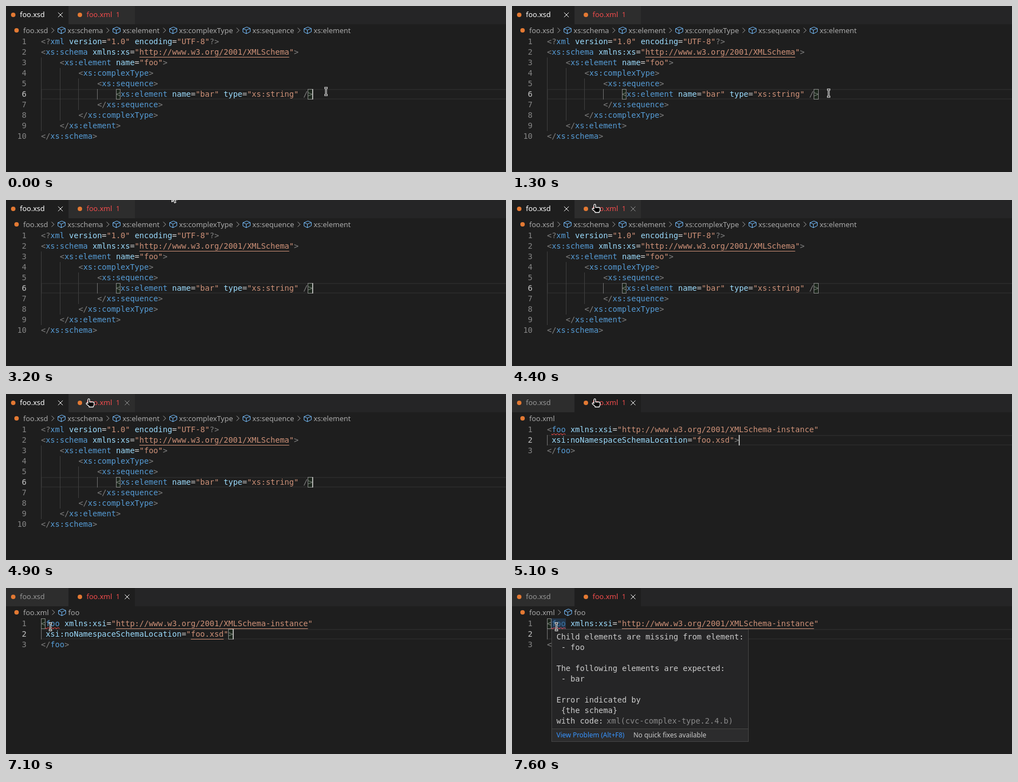
An HTML page that plays this animation: 900 px wide and 300 px high, repeating every 8 s.

```html
<!DOCTYPE html>
<html lang="en">
<meta charset="utf-8">
<title>Schema validation in an editor</title>
<style>
html, body { margin: 0; width: 100%; height: 100%; overflow: hidden; background: #1e1e1e }
body { position: relative; font: 13px "Noto Sans", "Open Sans", sans-serif }
.tabs { position: absolute; left: 0; right: 0; top: 0; height: 33px; background: #252526; overflow: hidden }
.tab { position: absolute; top: 0; height: 33px; background: #2d2d2d; color: #ffffff80; line-height: 31px }
.tab.active { background: #1e1e1e; color: #fff }
.tab > * { position: absolute; top: 0 }
.tab .dot { left: 9px; top: 12px }
.tab span { left: 25px }
.tab svg { top: 8px; stroke: #fff }
.error { color: #f14c4c }
.dot { width: 8px; height: 8px; border-radius: 50%; background: #e37933 }
.crumbs { position: absolute; left: 15px; top: 33px; height: 22px; display: flex; align-items: center; line-height: 22px; color: #a9a9a9; white-space: pre }
.crumbs .dot { margin-right: 8px }
.crumbs svg { flex: none }
.crumbs .cube { margin-right: 3px; stroke: #75beff }
.crumbs .chevron { stroke: #a9a9a9 }
.code, .hover pre { font: 14px/19px "DejaVu Sans Mono", monospace; white-space: pre; color: #d4d4d4 }
.code > * { position: absolute; box-sizing: border-box }
.num { left: 0; width: 37px; text-align: right; color: #858585 }
.num.now { color: #c6c6c6 }
.punct { color: #808080 }
.tag { color: #569cd6 }
.attr { color: #9cdcfe }
.str { color: #ce9178 }
u { text-decoration: none; text-underline-position: under }
.ready u { text-decoration: underline }
.now-line { left: 63px; right: 0; height: 19px; border: 2px solid #282828; border-right: 0 }
.guide { border-left: 1px solid #404040 }
.guide.on { border-color: #707070 }
.match { border: 1px solid #888; background: #0064001a }
.caret { border-left: 2px solid #aeafad; margin-left: -.8px }
.mark { background: #264f7880 }
.hover { position: absolute; left: 71px; top: 74px; background: #252526; border: 1px solid #454545 }
.hover pre { margin: 0; padding: 4px 8px; color: #ccc }
.hover pre span { margin-left: 6px; opacity: .6 }
.status { border-top: 1px solid #454545; background: #2c2c2d; padding: 0 8px; font-size: 12px; line-height: 22px; color: #ccc; white-space: pre }
.status span { color: #3794ff; margin-right: 16px }
#mouse { position: absolute; left: 0; top: 0; overflow: visible }
[hidden] { display: none !important }
</style>
<body>
<div class="tabs">
  <div class="tab" id="tab1" style="left:0;width:112px"><i class="dot"></i><span>foo.xsd</span></div>
  <div class="tab" id="tab2" style="left:113px;width:119px"><i class="dot" style="left:16px"></i><span class="error" style="left:32px">foo.xml</span><b class="error" style="left:85px;font-weight:400;font-size:12px">1</b></div>
</div>
<div id="xsd"></div>
<div id="xml"></div>
<div class="hover" id="hover"><pre>Child elements are missing from element:
 - foo

The following elements are expected:
 - bar

Error indicated by
 {the schema}
with code:<span>xml(cvc-complex-type.2.4.b)</span></pre><div class="status"><span>View Problem (Alt+F8)</span>No quick fixes available</div></div>
<svg id="mouse" width="1" height="1" stroke-linejoin="round">
  <g id="beam" fill="none"><path stroke="#fff" stroke-width="3" d="M-3-6.5H3M0-6.5V6.5M-3 6.5H3"/><path stroke="#000" d="M-2.5-6.5H2.5M0-6.5V6.5M-2.5 6.5H2.5"/></g>
  <path id="arrow" stroke="#fff" stroke-width="1.2" d="M.5 0V13.5L3.5 10.5 5.5 15.3 7.8 14.3 5.8 9.8H10Z"/>
  <path id="hand" stroke="#fff" stroke-width="1.3" d="M-1.5 1.2a1.5 1.5 0 0 1 3 0V5.5H7.5a2 2 0 0 1 2 2V10.5a4 4 0 0 1-1.5 3V14.5H.5V13L-4.2 9.2a1.3 1.3 0 0 1 1.6-2L-1.5 8Z"/>
</svg>
<script>
const $ = id => document.getElementById(id);
const icon = (cls, d) => `<svg class="${cls}" width="16" height="16" fill="none"><path d="${d}"/></svg>`;
const chevron = icon('chevron', 'M6 3.5 10.5 8 6 12.5');
const cube = icon('cube', 'M1.5 5 8.5 2 14.5 4.5V10.5L7.5 14 1.5 11ZM1.5 5 7.5 7.5 14.5 4.5M7.5 7.5V14');

[['tab1', 90], ['tab2', 97]].forEach(([id, x]) =>
  $(id).insertAdjacentHTML('beforeend', icon('close', 'M3.8 3.8 12.2 12.2M12.2 3.8 3.8 12.2').replace('<svg', `<svg style="left:${x}px"`)));

const esc = s => s.replace(/</g, '&lt;').replace(/>/g, '&gt;');
const paint = line => line.replace(/"([^"]*)"|[<>\/?]+|[\w:]+/g, (s, text, i) => {
  const link = /^http|\.xsd$/.test(text);
  const cls = s[0] === '"' ? 'str' : /[<>\/?]/.test(s) ? 'punct' : /[<\/?]/.test(line[i - 1]) ? 'tag' : 'attr';
  return `<span class="${cls}">${link ? `"<u>${text}</u>"` : esc(s)}</span>`;
});

// A box measured in characters and lines
const box = (cls, col, row, w = 0, h = 1, inner = '') =>
  `<div class="${cls}" style="left:calc(63px + ${col}ch);top:${55 + 19 * row}px;width:${w}ch;height:${19 * h}px">${inner}</div>`;

function editor(id, crumbs, source, now, extras) {
  const lines = source.split('\n');
  $(id).innerHTML = `<div class="crumbs"><i class="dot"></i>${crumbs.map((c, i) =>
      i ? `<span class="late" style="display:flex;align-items:center">${chevron}${cube}${c}</span>` : c).join('')}</div>
    <div class="code"><div class="now-line" style="top:${55 + 19 * now}px"></div>` +
    lines.map((l, i) => `<div class="num${i === now ? ' now' : ''}" style="top:${55 + 19 * i}px">${i + 1}</div>` +
      box('', 0, i, 80, 1, paint(l))).join('') +
    extras + box('caret', lines[now].length, now) + '</div>';
}

editor('xsd', ['foo.xsd', 'xs:schema', 'xs:element', 'xs:complexType', 'xs:sequence', 'xs:element'],
`<?xml version="1.0" encoding="UTF-8"?>
<xs:schema xmlns:xs="http://www.w3.org/2001/XMLSchema">
    <xs:element name="foo">
        <xs:complexType>
            <xs:sequence>
                <xs:element name="bar" type="xs:string" />
            </xs:sequence>
        </xs:complexType>
    </xs:element>
</xs:schema>`, 5,
  [0, 1, 2, 3].map(i => box(i === 3 ? 'guide on' : 'guide', 4 * i, 2 + i, 0, 7 - 2 * i)).join('') +
  box('match', 16, 5, 1) + box('match', 57, 5, 1));

const squiggle = `<svg width="100%" height="3" style="position:absolute;left:0;bottom:0"><pattern id="wave" width="6" height="3" patternUnits="userSpaceOnUse">
  <path fill="#f14c4c" d="M5.5 0 2.5 3H1.1L4.1 0ZM4 0 6 2V.6L5.4 0ZM0 2 1 3H2.4L0 .6Z"/></pattern><rect width="100%" height="3" fill="url(#wave)"/></svg>`;
editor('xml', ['foo.xml', 'foo'],
`<foo xmlns:xsi="http://www.w3.org/2001/XMLSchema-instance"
 xsi:noNamespaceSchemaLocation="foo.xsd">
</foo>`, 1,
  box('guide on', 0, 1) + box('mark', 1, 0, 3) + box('', 1, 0, 3, 1, squiggle) +
  box('match late', 0, 0, 1) + box('match late', 40, 1, 1));

// Pointer path: time, x, y
const path = [
  [0, 576, 154.5], [200, 576, 154.5], [600, 570, 157.5], [2800, 570, 157.5], [3200, 298, -10],
  [3400, 220, -40], [3500, 240, -25], [3600, 222, -8], [4000, 149, 8], [4800, 149, 8], [4900, 149, 9],
  [5800, 149, 9], [5900, 149, 10], [6400, 149, 10], [6600, 131.5, 29], [6900, 92, 60], [7100, 80, 70], [8000, 80, 70]
];
function pointer(t) {
  const i = path.findIndex(p => p[0] > t), [t0, x0, y0] = path[i - 1], [t1, x1, y1] = path[i];
  const k = (t - t0) / (t1 - t0);
  return [x0 + (x1 - x0) * k, y0 + (y1 - y0) * k];
}

const each = (sel, fn) => document.querySelectorAll(sel).forEach(fn);
const closers = document.querySelectorAll('.close');
const start = performance.now();

function draw() {
  // The screen refreshes ten times a second
  const t = Math.floor((performance.now() - start) % 8000 / 100) * 100;
  const second = t >= 5100, ready = t >= 5200;
  $('xsd').hidden = second;
  $('xml').hidden = !second;
  $('xsd').className = 'ready';
  $('xml').className = ready ? 'ready' : '';
  each('#xml .late', e => e.style.visibility = ready ? '' : 'hidden');
  $('tab1').classList.toggle('active', !second);
  $('tab2').classList.toggle('active', second);

  const caret = second ? Math.floor((t - 5100) / 500) % 2 === 0 : Math.floor((t - 296) / 501) % 2 !== 0;
  each('.caret', e => e.style.visibility = caret ? '' : 'hidden');

  const [x, y] = pointer(t);
  const shape = y >= 55 ? 'beam' : x < 232 ? 'hand' : 'arrow';
  for (const s of ['beam', 'hand', 'arrow']) $(s).style.display = s === shape ? '' : 'none';
  $('mouse').style.transform = `translate(${x}px, ${y}px)`;

  const over = y > -8 && y < 33 && x > 113 && x < 232;
  closers[0].style.opacity = second ? 0 : 1;
  closers[1].style.opacity = second ? 1 : over ? .5 : 0;

  $('hover').style.opacity = t < 7500 ? 0 : t < 7600 ? .5 : 1;
  each('.mark', e => e.style.visibility = t < 7500 ? 'hidden' : '');
  requestAnimationFrame(draw);
}
draw();
</script>
</body>
</html>
```
